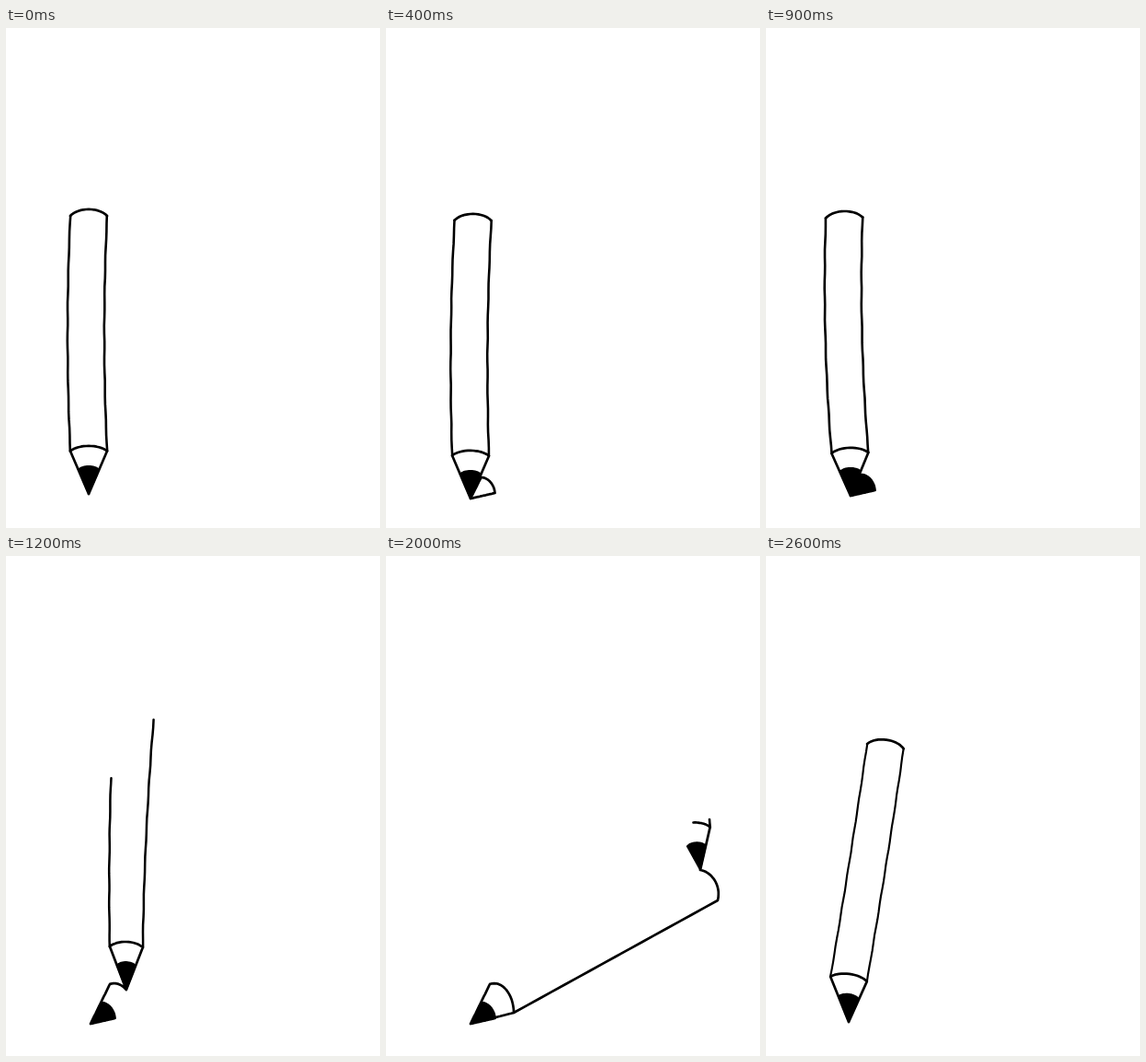
Write an HTML page that moves like this. It is 407 px wide and 543 px high and loops after 2.7 s.

```html
<!DOCTYPE html>
<html lang="en">
<head>
<meta charset="utf-8">
<title>Pencil</title>
<style>
  html, body { margin: 0; width: 100%; height: 100%; overflow: hidden; background: #fff; }
  svg { display: block; width: 100%; height: 100%; }
  path { stroke: #000; stroke-linecap: round; stroke-linejoin: round; }
</style>
</head>
<body>
<svg viewBox="0 0 407 543">
  <path id="body" fill="none"/>
  <path id="ink" fill="none" stroke-width="2.7"/>
  <path id="lead" fill="#000" stroke-width="1.6"/>
</svg>
<script>
const STEP = 100, COUNT = 27;
const CONE = 46.5, LENGTH = 303;

const el = id => document.getElementById(id);
const clamp = (v, lo, hi) => Math.min(hi, Math.max(lo, v));
const add = (p, q) => [p[0] + q[0], p[1] + q[1]];
const mix = (p, q, t) => [p[0] + (q[0] - p[0]) * t, p[1] + (q[1] - p[1]) * t];
const line = pts => 'M' + pts.map(p => p[0].toFixed(1) + ' ' + p[1].toFixed(1)).join('L');
const range = (n, f) => Array.from({ length: n + 1 }, (_, i) => f(i / n));

function turn(deg, u, v) {
  const r = deg * Math.PI / 180, c = Math.cos(r), s = Math.sin(r);
  return [u * c - v * s, u * s + v * c];
}
function bezier(pts, t) {
  while (pts.length > 1) pts = pts.slice(1).map((p, i) => mix(pts[i], p, t));
  return pts[0];
}
const curve = (pts, from = 0, to = 1) => range(16, t => bezier(pts, from + (to - from) * t));

// key points of the pencil being drawn
const home = [90, 506], nib = [92, 508];
const edge = [103.5, 485], corner = [118.5, 502];
const neck = [113, 465], heel = [139, 496], far = [361, 374], close = [342, 341];
const leadArc = [corner, [118, 493], [111, 485], edge];

// the tip follows these in turn; hidden ones shade the lead
const strokes = [
  { from: 0, to: 2, pts: [nib, corner] },
  { from: 2, to: 3, pts: leadArc },
  { from: 3, to: 4, pts: [edge, nib] },
  { from: 4, to: 7, pts: [nib, corner], hidden: true },
  { from: 7, to: 9, pts: [corner, nib], hidden: true },
  { from: 9, to: 11, pts: [nib, neck] },
  { from: 11, to: 13, pts: [neck, [126, 460], [139, 476], heel] },
  { from: 13, to: 15.2, pts: [nib, heel] },
  { from: 15.2, to: 18, pts: [heel, far] },
  { from: 18, to: 20, pts: [far, [365, 357], [354, 343], close] },
  { from: 20, to: 23, pts: [close, neck] }
];
const progress = (s, k) => clamp((k - s.from) / (s.to - s.from), 0, 1);

// the old pencil: upright, shading with a lean, then used up
function working(k) {
  const stroke = strokes.find(s => k <= s.to);
  const lean = k > 4 && k < 10 ? 8 * Math.sin(Math.PI * (k - 5) / 3.8) : 0;
  const late = clamp((k - 18) / 2, 0, 1);
  const u = k - 12, worn = k > 10;
  return {
    tip: bezier(stroke.pts, progress(stroke, k)),
    cone: .6 * lean - 9 * late,
    tilt: lean || (k < 9 ? .5 : 1.6 - 3.6 * late),
    taper: 2 * clamp((k - 9) / 3, 0, 1),
    left: worn ? 230 - 12.75 * u - 2 * u * u : LENGTH,
    right: worn ? Math.min(300, 295 - 30 * u) : LENGTH,
    arc: clamp((k - 18) / 4, 0, 1)
  };
}

// the finished pencil swings back upright
function swinging(k) {
  const tilt = 7.6 * ((COUNT - k) % COUNT) ** 1.68;
  return { tip: home, cone: Math.max(0, tilt - 7.6), tilt, taper: 0, left: LENGTH, right: LENGTH, arc: 0 };
}

function pencil(pose, k, out) {
  const { tip, cone, tilt, taper } = pose;
  const neckMid = add(tip, turn(cone, 0, -CONE)), end = add(tip, turn(tilt, 0, -LENGTH + 1));
  const base = s => add(neckMid, turn(tilt, s * (20 - taper), 0));
  const top = s => add(end, turn(tilt, s * (20 + taper), 0));
  const bow = Math.min(1, tilt / 2 - 3);

  function side(s, reach) {
    const p = base(s), q = top(s), f = clamp((reach - CONE) / (LENGTH - CONE), 0, 1);
    if (reach > 0) out.ink += line([tip, mix(tip, p, Math.min(1, reach / CONE))]);
    if (f > 0) out.body += line(range(30, t => {
      const v = t * f, rough = .2 * Math.sin(v * 41 + s * 2 + k);
      return add(mix(p, q, v), turn(tilt, bow * 4 * v * (1 - v) + rough, 0));
    }));
  }
  side(-1, pose.left);
  side(1, pose.right);

  const hump = (p, q, h) => {
    const up = turn(tilt, 0, -h);
    return [p, add(mix(p, q, .22), up), add(mix(p, q, .78), up), q];
  };
  if (pose.arc < 1) out.ink += line(curve(hump(base(-1), base(1), 7.5), pose.arc));
  if (pose.left === LENGTH) out.ink += line(curve(hump(top(-1), top(1), 9.5)));
  const l = mix(tip, base(-1), .57), r = mix(tip, base(1), .57);
  out.lead += line([tip, ...curve(hump(l, r, 5))]) + 'Z';
}

function drawing(k, out, shift) {
  for (const s of strokes) {
    if (k > s.from && !s.hidden)
      out.ink += line(curve(s.pts, 0, progress(s, k)).map(shift));
  }
  const shade = clamp((k - 4) / 5, 0, 1) ** 1.9;
  if (shade) out.lead += line([nib, ...curve(leadArc, 1, 1 - shade)].map(shift)) + 'Z';
}

function render(ms) {
  const k = Math.floor(ms / STEP) % COUNT;
  const out = { body: '', ink: '', lead: '' };
  const busy = k > 0 && k < 24;
  const pose = busy ? working(Math.min(k, 23)) : swinging(k);
  if (busy) {
    const sag = clamp(7 - k, 0, 3);
    const shift = p => add(p, [0, sag]);
    pose.tip = shift(pose.tip);
    drawing(k, out, shift);
  }
  if (k !== 23) pencil(pose, k, out);
  for (const id in out) el(id).setAttribute('d', out[id]);
  el('body').setAttribute('stroke-width', clamp(2.6 - pose.tilt * .06, 2.1, 2.6));
}

let begin;
function tick(now) {
  begin ??= now;
  render(now - begin);
  requestAnimationFrame(tick);
}
render(0);
requestAnimationFrame(tick);
</script>
</body>
</html>
```
